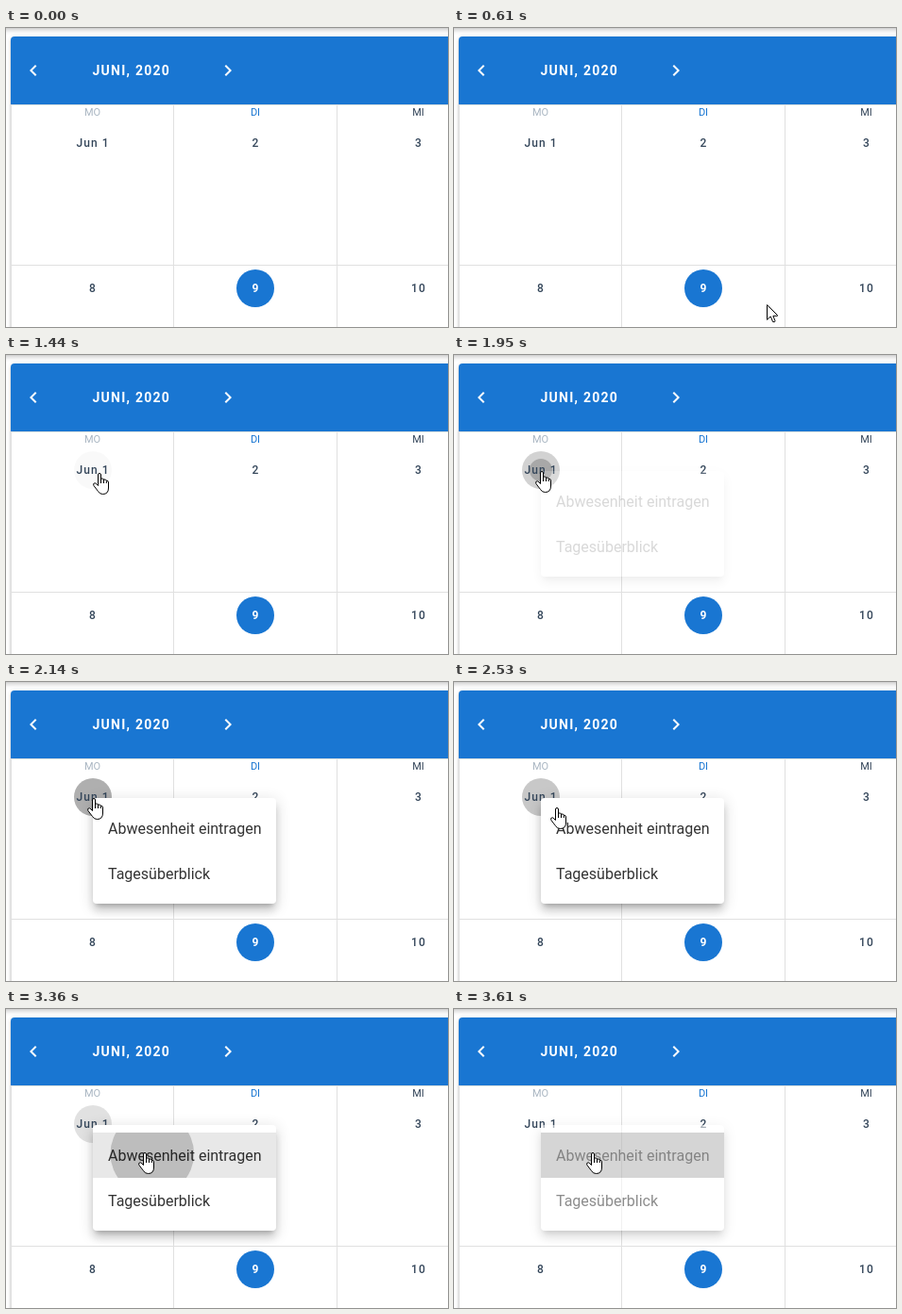
Write an HTML page with a canvas that moves like this. It is 468x317 px and loops after 3680 ms.

```html
<!DOCTYPE html>
<html lang="de">
<head>
<meta charset="utf-8">
<title>Kalender</title>
<style>
  html, body { margin: 0; width: 100%; height: 100%; overflow: hidden; background: #fff; }
  canvas { display: block; width: 468px; height: 317px; }
</style>
</head>
<body>
<canvas id="stage" width="468" height="317"></canvas>
<script>
const W = 468, H = 317, LOOP = 3680, REFRESH = 64;
const BLUE = '#1976d2', INK = '#34465a', LINE = '#e0e0e0';
const CLICK_DAY = 1760, OPEN_MENU = 1900, CLICK_ITEM = 3220;
const stage = document.getElementById('stage').getContext('2d');

// Pointer strokes along quadratic curves
const ENTER = { at: 610, span: 512, from: [359, 325], via: [230, 174], to: [150, 152] };
const TO_DAY = { at: 1200, span: 384, from: [150, 152], via: [95, 122], to: [92, 123] };
const TO_ITEM = { at: 2530, span: 384, from: [92, 123], via: [153, 160], to: [146, 152] };
const STROKES = [ENTER, TO_DAY, TO_ITEM];
const BURSTS = [0, CLICK_DAY, OPEN_MENU, CLICK_ITEM, ...STROKES.map(s => s.at)];

const clamp = v => Math.min(1, Math.max(0, v));
const ramp = (t, start, span) => clamp((t - start) / span);
const black = a => `rgba(0,0,0,${a})`;

// The screen refreshes in steps, counted from the latest burst of activity.
function heldTime(clock) {
  const burst = Math.max(...BURSTS.filter(b => b <= clock));
  return burst + Math.floor((clock - burst + REFRESH / 4) / REFRESH) * REFRESH;
}

// cubic-bezier(.4, 0, .2, 1)
function ease(x) {
  let lo = 0, hi = 1;
  for (let i = 0; i < 20; i++) {
    const u = (lo + hi) / 2, v = 1 - u;
    if (1.2 * v * v * u + .6 * v * u * u + u * u * u < x) lo = u; else hi = u;
  }
  return 3 * (1 - lo) * lo * lo + lo ** 3;
}

function layer() {
  const c = document.createElement('canvas');
  c.width = W;
  c.height = H;
  return c.getContext('2d');
}

function box(c, x, y, w, h, radius, fill) {
  c.beginPath();
  c.roundRect(x, y, w, h, radius);
  c.fillStyle = fill;
  c.fill();
}

function disc(c, x, y, r, fill) {
  c.beginPath();
  c.arc(x, y, r, 0, Math.PI * 2);
  c.fillStyle = fill;
  c.fill();
}

// Only the shadow lands on the stage; the shape casting it stays far to the left.
function shadow(c, x, y, w, h, dy, blur, spread, alpha) {
  const away = 2000;
  c.save();
  c.shadowColor = black(alpha);
  c.shadowOffsetX = away;
  c.shadowOffsetY = dy;
  c.shadowBlur = blur;
  box(c, x - spread - away, y - spread, w + 2 * spread, h + 2 * spread, 4, '#000');
  c.restore();
}

function raised(c, x, y, w, h, level) {
  shadow(c, x, y, w, h, level * .6, level * .65, -level * .35, .2);
  shadow(c, x, y, w, h, level, level * 1.25, 0, .14);
  shadow(c, x, y, w, h, level * .4, level * 2, level / 6, .12);
  box(c, x, y, w, h, 4, '#fff');
}

function text(c, str, x, y, font, fill, spacing = 0, align = 'left') {
  c.font = `${font} Roboto, sans-serif`;
  c.letterSpacing = spacing + 'px';
  c.fillStyle = fill;
  if (align === 'center') x -= c.measureText(str).width / 2;
  c.fillText(str, x, y);
}

function shape(c, path, x, y, outline) {
  c.save();
  c.translate(x, y);
  c.lineJoin = 'round';
  c.fillStyle = '#fff';
  c.fill(path);
  if (outline) c.stroke(path);
  c.restore();
}

const CHEVRON_LEFT = new Path2D('M15.41 16.58L10.83 12l4.58-4.59L14 6l-6 6 6 6z');
const CHEVRON_RIGHT = new Path2D('M8.59 16.58L13.17 12 8.59 7.41 10 6l6 6-6 6z');
const ARROW = new Path2D('M.5 .5V16.3L4.2 12.8L6.6 18.5H8.6L9 17.6L6.9 12.2H11.5V11.5Z');
const HAND = new Path2D('M5.5 13.5V2Q5.5 .5 7 .5T8.5 2V6Q11.3 5.6 11.5 7Q14 6.6 14.3 8.2Q16.5 8 16.5 10V16Q16.5 22.5 10.5 22.5Q7 22.5 5.5 19.5L1 13.6Q.2 11.8 1.2 11Q2.6 10.2 4 12ZM8.5 6V11M11.5 7V11M14.3 8.2V11');

function drawPage(c) {
  c.fillStyle = '#fff';
  c.fillRect(0, 0, W, H);
  raised(c, -20, -62, W + 40, 60, 4);
  raised(c, 5, 9, W + 20, H + 20, 2);
  c.fillStyle = LINE;
  for (const x of [5, 177, 350]) c.fillRect(x, 81, 1, H);
  for (const y of [81, 251]) c.fillRect(5, y, W, 1);
  box(c, 5, 9, W, 72, [4, 0, 0, 0], BLUE);
  shape(c, CHEVRON_LEFT, 17, 33);
  shape(c, CHEVRON_RIGHT, 223, 33);
  text(c, 'JUNI, 2020', 91.5, 50, '700 14px', '#fff', 1.25);

  const weekday = (str, x, fill) => text(c, str, x, 93, '400 11px', fill, 0, 'center');
  weekday('MO', 91.5, '#a9b6c2');
  weekday('DI', 264, BLUE);
  weekday('MI', 436.5, INK);
  disc(c, 264, 276, 20, BLUE);
  drawDay(c, '2', 264.5, 126);
  drawDay(c, '3', 437, 126);
  drawDay(c, '8', 92, 280);
  drawDay(c, '9', 264.5, 280, '#fff', 700);
  drawDay(c, '10', 437, 280);
}

function drawDay(c, str, x, y, fill = INK, weight = 500) {
  text(c, str, x, y, weight + ' 12px', fill, 1.07, 'center');
}

function drawFirstDay(c, t) {
  const hover = .04 * ramp(t, 1340, 200);
  const focus = .175 * ramp(t, 1840, 160);
  disc(c, 92, 122, 20, black((hover + focus) * (1 - ramp(t, CLICK_ITEM, 280))));
  if (t >= CLICK_DAY) {
    const radius = 12 + 8 * ramp(t, 1964, 100);
    disc(c, 92, 122, radius, black(.2 * (1 - ramp(t, 2080, 200))));
  }
  drawDay(c, 'Jun 1', 92, 126);
}

function drawMenu(c, t) {
  c.clearRect(0, 0, W, H);
  raised(c, 92, 123, 194, 112, 8);
  c.save();
  c.beginPath();
  c.rect(92, 131, 194, 48);
  c.clip();
  c.fillStyle = black(.04 * ramp(t, TO_ITEM.at, 190) + .05 * ramp(t, CLICK_ITEM - REFRESH, 128));
  c.fillRect(92, 131, 194, 48);

  // The ripple drifts from the click point to the item's centre as it grows.
  const age = t - CLICK_ITEM - 69;
  if (age > 0) {
    const p = ease(clamp(age / 250));
    disc(c, 146 + 43 * p, 153 + 2 * p, 100 * (.3 + .7 * p), black(.215 * ease(clamp(age / 100))));
  }
  c.restore();
  text(c, 'Abwesenheit eintragen', 108, 161, '400 16px', black(.8));
  text(c, 'Tagesüberblick', 108, 209, '400 16px', black(.8));
}

function pointerAt(t) {
  const { at, span, from, via, to } = STROKES.filter(s => s.at <= t).pop();
  const p = clamp((t - at + REFRESH) / (span + REFRESH)), q = 1 - p;
  return from.map((v, i) => Math.round(q * q * v + 2 * p * q * via[i] + p * p * to[i]));
}

function drawPointer(c, t) {
  if (t < ENTER.at) return;
  const [x, y] = pointerAt(t);
  const onDay = Math.hypot(x - 92, y - 122) <= 20;
  if (onDay || t >= TO_ITEM.at) shape(c, HAND, x - 6, y, true);
  else shape(c, ARROW, x, y, true);
}

const pageLayer = layer(), menuLayer = layer();

function draw(now) {
  const t = heldTime(now % LOOP);
  stage.drawImage(pageLayer.canvas, 0, 0);
  drawFirstDay(stage, t);
  const alpha = ramp(t, OPEN_MENU + 25, 210) - ramp(t, 3490, 260);
  if (alpha > 0) {
    drawMenu(menuLayer, t);
    stage.globalAlpha = alpha;
    stage.drawImage(menuLayer.canvas, 0, 0);
    stage.globalAlpha = 1;
  }
  drawPointer(stage, t);
}

drawPage(pageLayer);
const start = performance.now();
function frame() {
  draw(performance.now() - start);
  requestAnimationFrame(frame);
}
frame();
</script>
</body>
</html>
```
